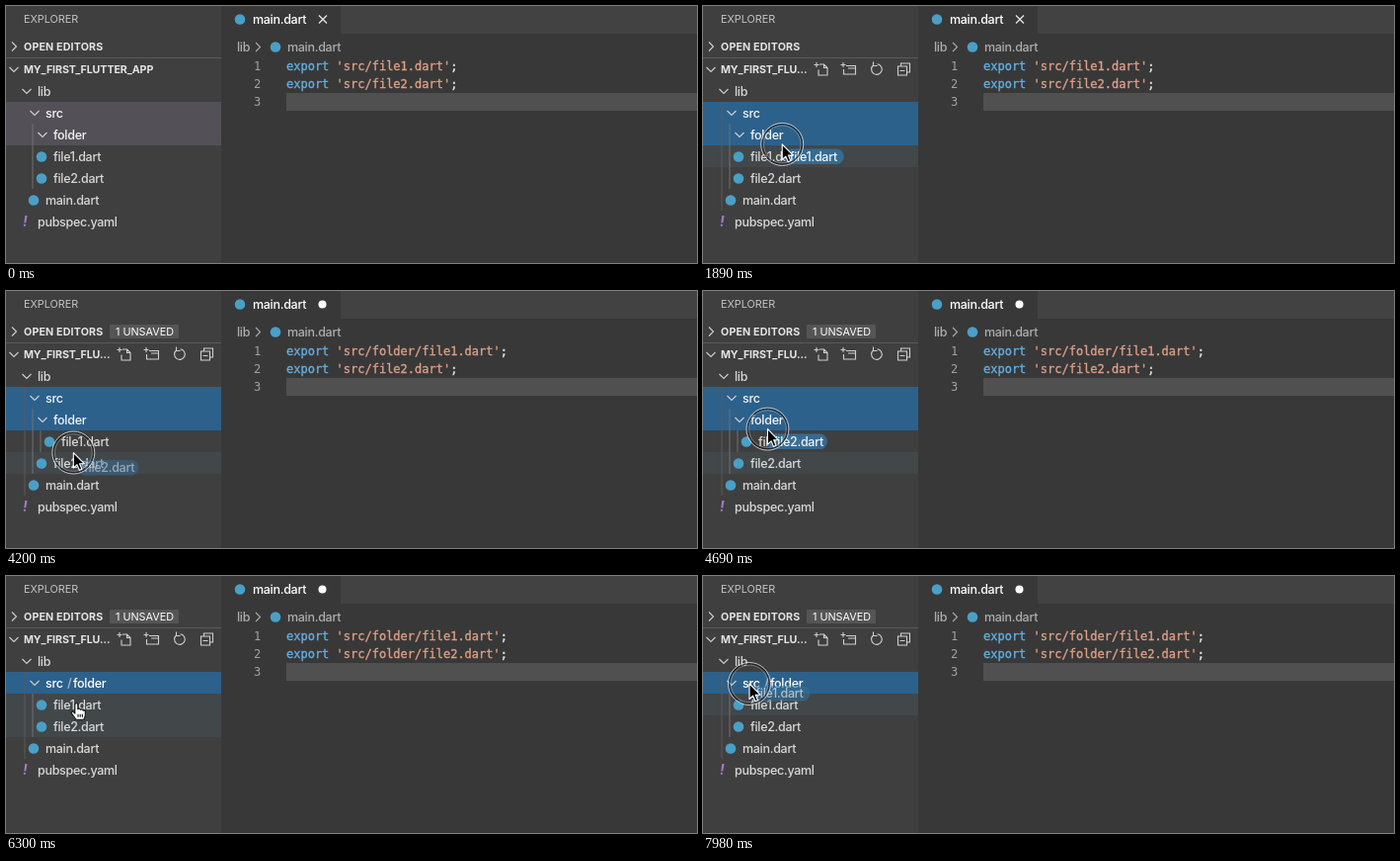
Write an HTML page with a canvas that moves like this. It is 700 px wide and 260 px high and loops after 8 s.

```html
<!DOCTYPE html>
<html lang="en">
<head>
<meta charset="utf-8">
<title>Moving files in an editor</title>
<style>
  html, body { margin: 0; width: 700px; height: 260px; overflow: hidden; background: #383838; }
  canvas { display: block; }
</style>
</head>
<body>
<canvas id="stage" width="700" height="260"></canvas>
<script>
const ctx = document.getElementById('stage').getContext('2d');
const LOOP = 8000, FIRST_DROP = 2380, SECOND_DROP = 5500;
const UI = 'Inter, sans-serif', MONO = '12px "DejaVu Sans Mono", monospace';
const BLUE = '#2c618c', TEXT = '#d8d8d8';

// time, x, y of the pointer tip
const PATH = [
  [50, 232, 275], [280, 150, 176], [490, 150, 176], [1150, 86, 152], [1550, 86, 150],
  [2250, 74, 129], [2480, 74, 130], [2800, 66, 133], [3080, 66, 133],
  [3750, 77, 175], [4030, 78, 175], [4330, 62, 156], [4800, 66, 137], [5390, 65, 130],
  [5810, 65, 130], [6580, 74, 129], [6790, 74, 129], [7140, 60, 120], [7560, 53, 114],
  [7980, 47, 109], [8000, 47, 109]
];
const DRAGS = [
  { from: 1450, to: FIRST_DROP, name: 'file1.dart' },
  { from: 4000, to: SECOND_DROP, name: 'file2.dart' },
  { from: 6790, to: LOOP, name: 'file1.dart' }
];

// depth and label of each visible tree row
function treeRows(t) {
  const end = [[1, 'main.dart'], [0, 'pubspec.yaml']];
  if (t >= SECOND_DROP)
    return [[0, 'lib'], [1, 'src/folder'], [2, 'file1.dart'], [2, 'file2.dart'], ...end];
  return [[0, 'lib'], [1, 'src'], [2, 'folder'],
    [t < FIRST_DROP ? 2 : 3, 'file1.dart'], [2, 'file2.dart'], ...end];
}

function pointer(t) {
  const i = PATH.findIndex(p => p[0] > t);
  if (i < 1) return i ? PATH.at(-1).slice(1) : PATH[0].slice(1);
  const [t0, x0, y0] = PATH[i - 1], [t1, x1, y1] = PATH[i];
  const u = (t - t0) / (t1 - t0), k = u * u * (3 - 2 * u);
  return [x0 + (x1 - x0) * k, y0 + (y1 - y0) * k];
}

function rect(x, y, w, h, color) {
  ctx.fillStyle = color;
  ctx.fillRect(x, y, w, h);
}

function text(s, x, y, color = TEXT, font = '500 12.5px ' + UI, spacing = -0.3) {
  ctx.font = font;
  ctx.letterSpacing = spacing + 'px';
  ctx.fillStyle = color;
  ctx.fillText(s, x, y);
}

// monospaced text, slightly thickened
function code(s, x, y, color) {
  text(s, x, y, color, MONO, 0);
  ctx.strokeStyle = color;
  ctx.lineWidth = 0.35;
  ctx.strokeText(s, x, y);
}

function dot(x, y, r, color) {
  ctx.fillStyle = color;
  ctx.beginPath();
  ctx.arc(x, y, r, 0, 7);
  ctx.fill();
}

function pill(x, y, w, h, r, color) {
  ctx.fillStyle = color;
  ctx.beginPath();
  ctx.roundRect(x, y, w, h, r);
  ctx.fill();
}

function stroke(path, color = '#cfcfcf', width = 1.1) {
  ctx.strokeStyle = color;
  ctx.lineWidth = width;
  ctx.stroke(new Path2D(path));
}

const fileIcon = (x, y) => dot(x, y, 5.3, '#4a9fc6');
const chevronDown = (x, y) => stroke(`M${x - 4.5} ${y - 2}l4.5 4.5 4.5 -4.5`);
const chevronRight = (x, y, color) => stroke(`M${x - 2} ${y - 4.5}l4.5 4.5 -4.5 4.5`, color);

function editor(t) {
  const dirty = t >= FIRST_DROP;
  rect(218, 0, 482, 260, '#383838');
  rect(339, 0, 361, 28, '#424242');
  fileIcon(237, 13.5);
  text('main.dart', 250, 17.5, '#fff');
  if (dirty) dot(320.5, 13.5, 4, '#fff');
  else stroke('M317 9.5l8 8m0 -8l-8 8', '#e6e6e6', 1.3);
  text('lib', 234, 46, '#adadad');
  chevronRight(255, 41.5, '#adadad');
  fileIcon(273, 41.5);
  text('main.dart', 285, 46, '#adadad');

  rect(284, 88, 416, 18, '#505050');
  const paths = [dirty ? 'src/folder/file1.dart' : 'src/file1.dart',
    t >= SECOND_DROP ? 'src/folder/file2.dart' : 'src/file2.dart'];
  for (let i = 0; i < 3; i++) text(i + 1, 251, 65 + 18 * i, '#a2a2a2', MONO, 0);
  paths.forEach((path, i) => {
    const y = 65 + 18 * i, w = 7.224;
    code('export', 284, y, '#62b0e4');
    code(`'${path}'`, 284 + 7 * w, y, '#de9f86');
    code(';', 284 + (9 + path.length) * w, y, '#e4e4e4');
  });
}

function toolbar() {
  stroke('M118 59h4.5l3.5 3.5v7.5h-9v-5.5M122.5 59v3.5h3.5M115 57v5m-2.5 -2.5h5');
  stroke('M145 60.5h9.5v8.5h-12v-5M142 57v5m-2.5 -2.5h5M147 63h7.5');
  stroke('M172.5 60a5.3 5.3 0 1 0 4 -1.2M172.5 56.5v4h4');
  stroke('M200.5 61v-3h9v9h-3M197.5 61h9v9h-9zM199.5 65.5h5');
}

function header(t, hovered) {
  const bold = '700 10.7px ' + UI;
  text('EXPLORER', 18, 17, '#c4c4c4', '10.8px ' + UI, 0);
  chevronRight(8, 41);
  text('OPEN EDITORS', 18, 45, '#e4e4e4', bold, 0.15);
  if (t >= FIRST_DROP) {
    pill(105, 34, 70, 14, 1, '#555');
    text('1 UNSAVED', 111, 45, '#fff', '10.8px ' + UI, 0);
  }
  rect(0, 52, 218, 1, '#5a5a5a');
  chevronDown(8, 64);
  text(hovered ? 'MY_FIRST_FLU...' : 'MY_FIRST_FLUTTER_APP', 18, 68, '#e4e4e4', bold, -0.1);
  if (hovered) toolbar();
}

function tree(t, hovered, y, drag) {
  const rows = treeRows(t);
  const pressed = DRAGS.findLast(d => t >= d.from);
  const hoverRow = hovered && !drag ? Math.floor((y - 75) / 22) : -1;
  const dropping = drag && y < 137.5 && t < SECOND_DROP;

  rows.forEach(([depth, name], i) => {
    let color = null;
    if (i === hoverRow || (pressed && name === pressed.name)) color = '#42474a';
    if (/^src|^folder/.test(name)) color = pressed ? BLUE : '#535157';
    if (dropping && (name === 'folder' || depth === 3)) color = '#55595b';
    if (color) rect(0, 75 + 22 * i, 218, 22, color);
  });

  const last = rows.length - 2;
  if (hovered) rect(18.5, 97, 1, 22 * last, '#5a5a5a');
  rect(26.5, 119, 1, 22 * (last - 2), '#707070');
  if (rows.some(r => r[0] === 3)) rect(34.5, 141, 1, 22, '#707070');

  rows.forEach(([depth, name], i) => {
    const x = 32 + 8 * depth, mid = 86 + 22 * i;
    if (name.endsWith('.dart')) fileIcon(x - 12, mid + 0.5);
    else if (name.endsWith('.yaml')) text('!', x - 15, mid + 5, '#a77bc6', 'italic 700 14px ' + UI, 0);
    else chevronDown(x - 11, mid);
    if (name === 'src/folder') {
      text('src', x, mid + 4.5, '#fff');
      text('/', 62, mid + 4.5, '#a9bccd');
      text('folder', 68, mid + 4.5, '#fff');
      if (t >= 6650 && t < 7500) rect(68, mid + 6, 34, 1, '#fff');
    } else {
      text(name, x, mid + 4.5, /^src|^folder/.test(name) ? '#f4f4f4' : TEXT);
    }
  });
}

function dragImage(t, drag) {
  const [x, y] = pointer(Math.max(drag.from, t - 60));
  const fadeOut = t > 7800 ? 1 - (t - 7800) / 500 : 1;
  ctx.globalAlpha = Math.min(0.92, (t - drag.from) / 420) * fadeOut;
  pill(x, y + 2, 61, 15.5, 7.5, '#356f99');
  text(drag.name, x + 6, y + 14, '#fff');
  ctx.globalAlpha = 1;
}

function ring(x, y) {
  const circle = r => `M${x - r} ${y}a${r} ${r} 0 1 0 ${2 * r} 0a${r} ${r} 0 1 0 ${-2 * r} 0`;
  stroke(circle(20.2), 'rgba(20, 20, 20, .6)', 1.8);
  stroke(circle(21.5), 'rgba(235, 235, 235, .85)', 0.9);
  stroke(circle(18.9), 'rgba(235, 235, 235, .5)', 0.7);
}

const ARROW = new Path2D('M0 0V15.5L3.6 12.2 6 17.8 8.6 16.7 6.2 11.2H11Z');
const HAND = new Path2D('M-1.5 .8C-1.5 -1 1.4 -1 1.5 .8V5.5C2 4.6 4 4.8 4.2 6 5 5.2 6.6 5.6 6.8 6.8' +
  ' 7.8 6.2 9 6.8 9 8.2V11.5C9 13 8 14 7.5 16H-.5C-1.5 13.5 -3.5 12 -5 9.6 -5.6 8.2 -4 7.4 -2.9 8.4L-1.5 9.8Z');

function drawPointer(x, y, shape) {
  ctx.save();
  ctx.translate(x, y);
  ctx.lineJoin = 'round';
  const hand = shape === HAND;
  ctx.fillStyle = hand ? '#fff' : '#000';
  ctx.strokeStyle = hand ? '#111' : '#fff';
  ctx.lineWidth = 1.1;
  ctx.fill(shape);
  ctx.stroke(shape);
  if (hand) ctx.stroke(new Path2D('M1.7 10.5v3M3.9 10.5v3M6.1 10.5v3'));
  ctx.restore();
}

function draw(now) {
  const t = now % LOOP;
  const [x, y] = pointer(t);
  const hovered = t >= 70 && x < 218;
  const drag = DRAGS.find(d => t >= d.from && t < d.to);

  rect(0, 0, 218, 260, '#3f3f40');
  tree(t, hovered, y, drag);
  header(t, hovered);
  editor(t);
  if (drag) {
    dragImage(t, drag);
    ring(x, y);
  }
  if (t >= 70) drawPointer(x, y, hovered && !drag ? HAND : ARROW);
  requestAnimationFrame(draw);
}
requestAnimationFrame(draw);
</script>
</body>
</html>
```
